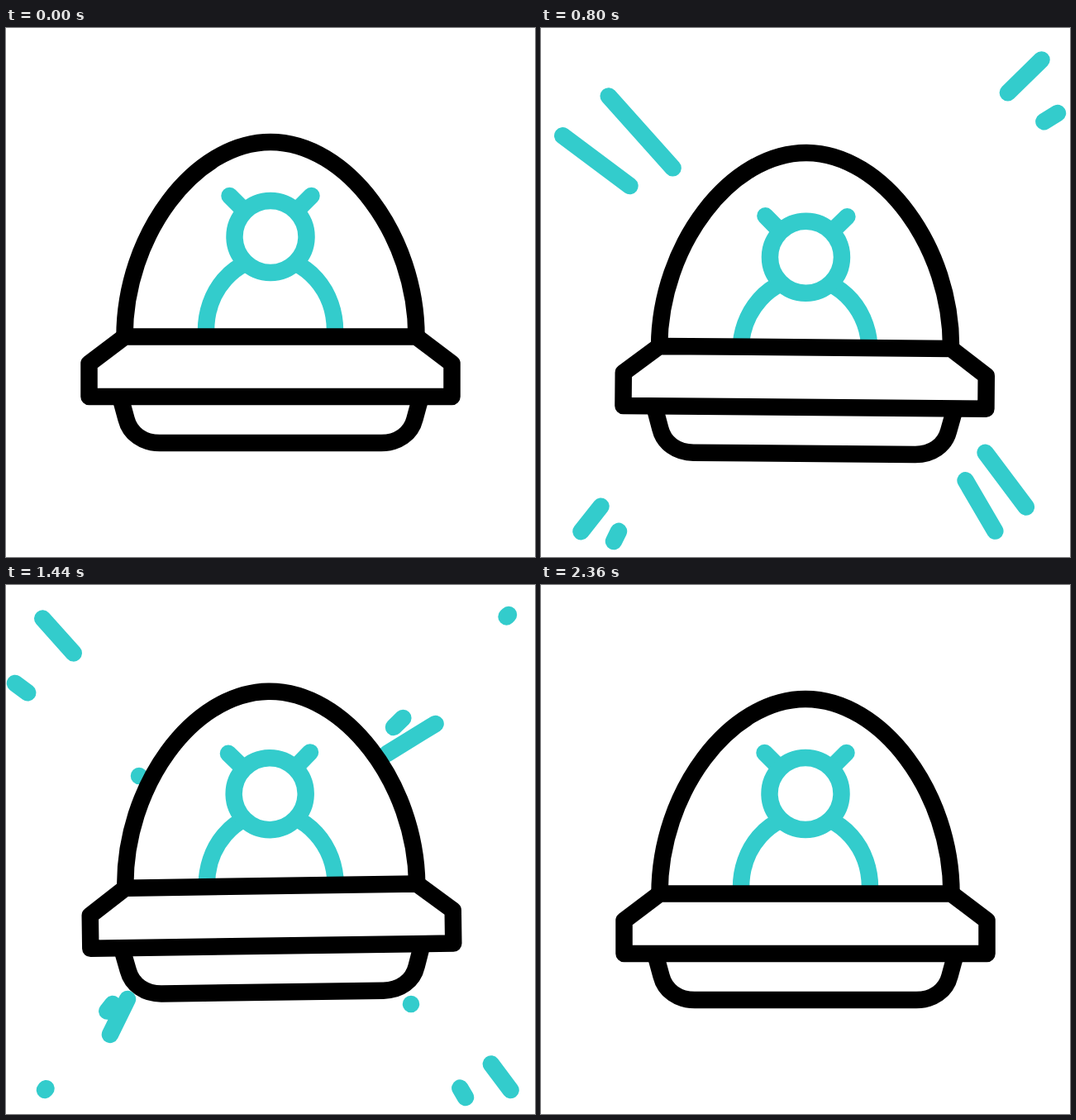
Recreate the animation shown at these times as an HTML page. Size 640 px wide and 640 px high, loop 2400 ms.

```html
<!DOCTYPE html>
<html lang="en">
<head>
<meta charset="utf-8">
<title>Hovering saucer</title>
<style>
  html, body { margin: 0; width: 100%; height: 100%; overflow: hidden; background: #fff; }
  svg { display: block; width: 100vw; height: 100vh; }
  path, circle { stroke-width: 20.5; stroke-linecap: round; stroke-linejoin: round; fill: #fff; }
  .ink { stroke: #000; }
  .glow { stroke: #3cc; }
  .open { fill: none; }
</style>
</head>
<body>
<svg viewBox="0 0 640 640">
  <defs id="beams">
    <path d="M170 181L42 38"/>
    <path d="M161 231L11 119"/>
    <path d="M531 505L612 613"/>
    <path d="M490 507L556 620"/>
    <path d="M469 172L608 36"/>
    <path d="M461 204L625 103"/>
    <path d="M129 507L47 611"/>
    <path d="M147 501L88 621"/>
  </defs>
  <path id="rays" class="glow open"/>
  <g id="ship">
    <path class="ink" d="M143.5 373.5C143.5 251 228 138 320 138S496.5 251 496.5 373.5"/>
    <path id="torso" class="glow open" d="M242 392V366A78 88 0 0 1 398 366V392"/>
    <g id="head">
      <path class="glow open" d="M270.5 203l17 17M369.5 203l-17 17"/>
      <circle class="glow" cx="320" cy="252.5" r="43.5"/>
    </g>
    <path class="ink" d="M139.5 451L145.5 473C150 491 166 502 186 502H454C474 502 490 491 494.5 473L500.5 451"/>
    <path class="ink" d="M143.5 373.5H496.5L539.5 406V446H100.5V406Z"/>
  </g>
</svg>
<script>
const LOOP = 2400, TICK = 40, REST = 160;
const $ = id => document.getElementById(id);
const [ship, head, torso, rays] = ['ship', 'head', 'torso', 'rays'].map($);
const clamp = (v, a, b) => Math.min(b, Math.max(a, v));

// The two beams of a corner fire half a tick apart; one diagonal trails the other by a tick
const beams = [...$('beams').children].map((path, i) => ({
  path,
  length: path.getTotalLength(),
  delay: (i < 4 ? 1 : 0) - (i % 2) / 2
}));

// A beam crosses its line in three ticks, fast in the middle
function reach(v) {
  const x = clamp((v + 0.5) / 3, 0, 1);
  return x * x / (x * x + 0.45 * (1 - x) ** 2);
}

// Bursts come every four ticks, and faster for a while in the second half
const burstGap = tick => tick >= 30 && tick < 42 ? 3 : 4;

function rayPath(tick) {
  let d = '';
  for (let start = 6; start < 56; start += burstGap(start)) {
    for (const { path, length, delay } of beams) {
      const v = tick - start - delay;
      const tail = reach(v - 1), tip = reach(v);
      if (v < -0.5 || tail >= 1) continue;
      const at = k => {
        const { x, y } = path.getPointAtLength(k * length);
        return `${x} ${y}`;
      };
      d += `M${at(tail)}L${at(tip)}`;
    }
  }
  return d;
}

// Sum of sine harmonics, at rest at both ends of the run
const sway = (p, ...amps) =>
  amps.reduce((sum, a, i) => sum + a * Math.sin(2 * Math.PI * (i + 1) * p), 0);

// Two dips
const bounce = p => Math.sin(Math.PI * clamp(p, 0, 0.86) / 0.43) ** 2;

const shift = (el, y, turn = 0) =>
  el.setAttribute('transform', `translate(0 ${y}) rotate(${turn} 320 320)`);

function draw(t) {
  const tick = Math.floor(t / TICK);
  const p = clamp((tick * TICK - REST) / (LOOP - TICK - REST), 0, 1);
  shift(ship, sway(p, 11, -4.6), sway(p, 0.21, -0.86, -0.63, -0.69));
  shift(head, 21 * (1 - 0.75 * p) * bounce(p));
  shift(torso, 13 * bounce(p - 0.04));
  rays.setAttribute('d', rayPath(tick));
}

const begin = performance.now();
function loop() {
  draw((performance.now() - begin) % LOOP);
  requestAnimationFrame(loop);
}
loop();
</script>
</body>
</html>
```
